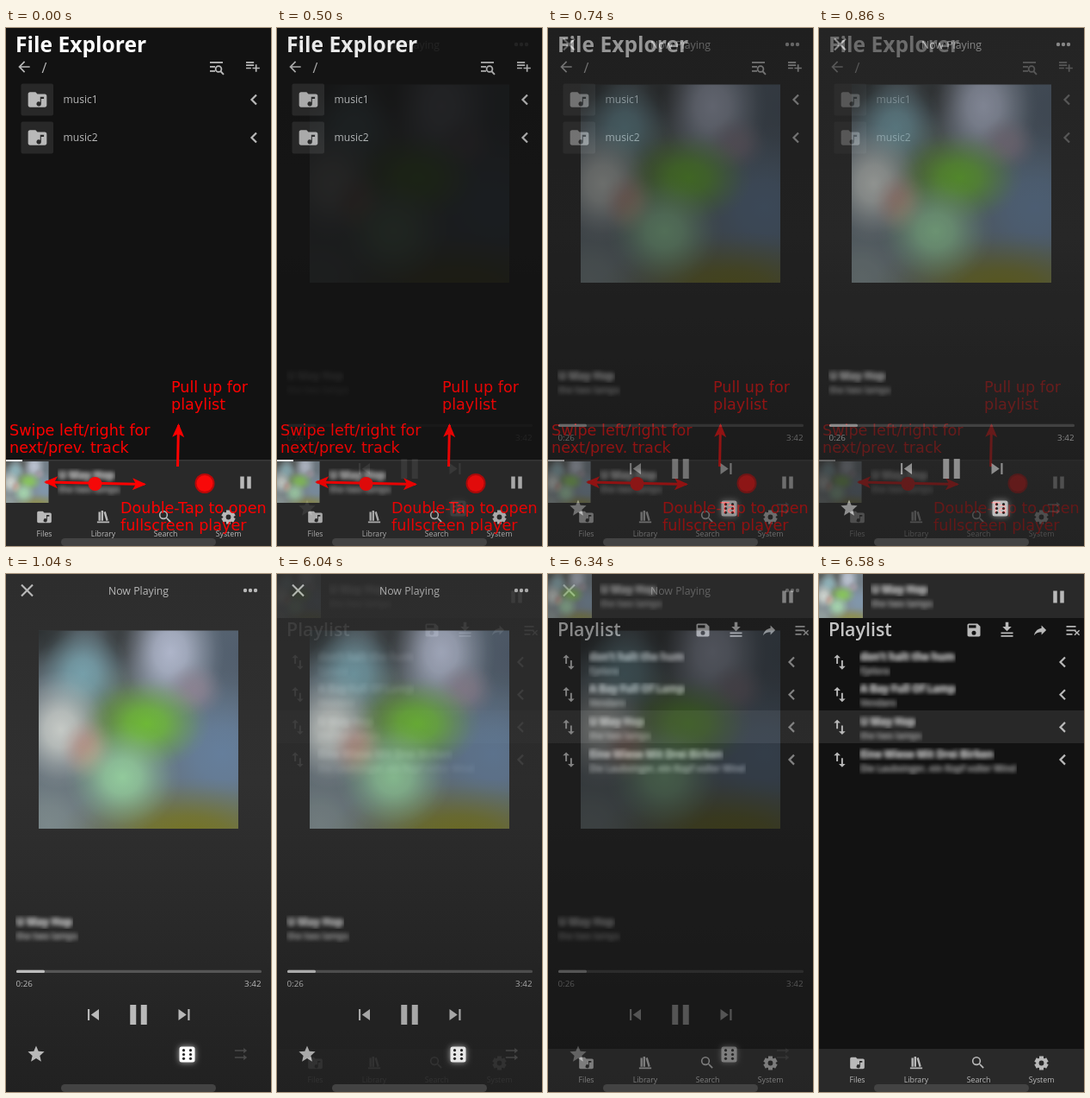
Animation, 308 px wide and 600 px high, one loop 8 s. Source, as an HTML page with a canvas:

```html
<!DOCTYPE html>
<html lang="en">
<head>
<meta charset="utf-8">
<title>Music player tour</title>
<style>
html, body { margin: 0; width: 100%; height: 100%; overflow: hidden; background: #121212; }
canvas { display: block; width: 100%; height: 100%; }
</style>
</head>
<body>
<canvas id="stage"></canvas>
<script>
const W = 308, H = 600, LOOP = 8000, STEP = 60, STEPS = 10;
const ratio = window.devicePixelRatio || 1;
const UI = '"Open Sans", "Noto Sans", sans-serif';
const NOTE = '"DejaVu Sans", sans-serif';
const INK = '#b9b9b9', BAR = '#292929', RED = '#ff0000';

const ICONS = {
  folder: 'M20 6h-8l-2-2H4c-1.1 0-2 .9-2 2v12c0 1.1.9 2 2 2h16c1.1 0 2-.9 2-2V8c0-1.1-.9-2-2-2zM19 9v2h-3v5.5a2.5 2.5 0 1 1-1-2V9z',
  back: 'M20 11H7.83l5.59-5.59L12 4l-8 8 8 8 1.41-1.41L7.83 13H20z',
  add: 'M14 10H3v2h11zM14 6H3v2h11zM18 14v-4h-2v4h-4v2h4v4h2v-4h4v-2zM3 16h7v-2H3z',
  books: 'M9 3v15h3V3zM12.6 5.3l3.8 13 2.9-.9-3.8-13zM5 5v13h3V5zM3 19v2h18v-2z',
  search: 'M15.5 14h-.79l-.28-.27A6.47 6.47 0 0 0 16 9.5 6.5 6.5 0 1 0 9.5 16c1.61 0 3.09-.59 4.23-1.57l.27.28v.79l5 4.99L20.49 19zM9.5 14a4.5 4.5 0 1 1 0-9 4.5 4.5 0 0 1 0 9z',
  star: 'M12 17.27 18.18 21l-1.64-7.03L22 9.24l-7.19-.61L12 2 9.19 8.63 2 9.24l5.46 4.73L5.82 21z',
  prev: 'M6 6h2v12H6zM9.5 12l8.5 6V6z',
  next: 'M6 18l8.5-6L6 6zM16 6h2v12h-2z',
  save: 'M17 3H5c-1.11 0-2 .9-2 2v14c0 1.1.89 2 2 2h14c1.1 0 2-.9 2-2V7zM12 19a3 3 0 1 1 0-6 3 3 0 0 1 0 6zM15 9H5V5h10z',
  download: 'M10 2h4v6h4l-6 6-6-6h4zM4 15.5h16v2H4zM4 19.5h16v2H4z',
  share: 'M14 9V5l7 7-7 7v-4.1c-5 0-8.5 1.6-11 5.1 1-5 4-10 11-11z',
  swap: 'M16 17.01V10h-2v7.01h-3L15 21l4-3.99zM9 3 5 6.99h3V14h2V6.99h3z',
  shift: 'M3 6h13V3l5 4-5 4V8H3zM3 16h13v-3l5 4-5 4v-3H3z'
};

// Soft cover colours: centre, radii (unit square) and colour
const BLOBS = [
  [0, 0, .32, .3, '#262929'], [.42, .02, .24, .34, '#343738'],
  [1, .12, .35, .5, '#4f5c6c'], [.36, .4, .25, .25, '#5c6a54'],
  [.92, .62, .45, .42, '#6580a0'], [.05, .98, .3, .3, '#7e8b8c'],
  [.22, .22, .24, .26, '#78a5b0'], [.66, .11, .27, .34, '#b8bed4'],
  [.78, .3, .16, .15, '#8d8291'], [.11, .5, .26, .3, '#d2d5cf'],
  [.25, .6, .15, .17, '#b88c80'], [.75, 1.02, .65, .28, '#77741a'],
  [.54, .47, .32, .24, '#6fc22e'], [.42, .74, .29, .28, '#98d6a0']
];

let c;

function sheet(paint) {
  const canvas = document.createElement('canvas');
  canvas.width = W * ratio;
  canvas.height = H * ratio;
  c = canvas.getContext('2d');
  c.scale(ratio, ratio);
  paint();
  return canvas;
}

function box(x, y, w, h, color, r = 0) {
  c.fillStyle = color;
  c.beginPath();
  c.roundRect(x, y, w, h, r);
  c.fill();
}

function dot(x, y, r, color) {
  c.fillStyle = color;
  c.beginPath();
  c.arc(x, y, r, 0, Math.PI * 2);
  c.fill();
}

function line(points, color, width) {
  c.strokeStyle = color;
  c.lineWidth = width;
  c.beginPath();
  points.forEach(([x, y]) => c.lineTo(x, y));
  c.stroke();
}

function text(str, x, y, size, color = INK, weight = 400, family = UI) {
  c.font = `${weight} ${size}px ${family}`;
  c.fillStyle = color;
  c.fillText(str, x, y);
}

function centered(str, x, y, size, color) {
  c.textAlign = 'center';
  text(str, x, y, size, color);
  c.textAlign = 'left';
}

function icon(name, x, y, size, color = INK) {
  c.save();
  c.translate(x, y);
  c.scale(size / 24, size / 24);
  c.translate(-12, -12);
  c.fillStyle = color;
  c.fill(new Path2D(ICONS[name]), 'evenodd');
  c.restore();
}

function cog(x, y) {
  for (let i = 0; i < 3; i++) {
    const a = Math.PI / 6 + i * Math.PI / 3;
    const dx = Math.cos(a) * 8, dy = Math.sin(a) * 8;
    line([[x - dx, y - dy], [x + dx, y + dy]], INK, 5);
  }
  dot(x, y, 6.2, INK);
  dot(x, y, 2.9, BAR);
}

function chevron(x, y) {
  line([[x + 5.5, y - 5.5], [x, y], [x + 5.5, y + 5.5]], INK, 2.2);
}

function cross(x, y, r, width, color = INK) {
  line([[x - r, y - r], [x + r, y + r]], color, width);
  line([[x + r, y - r], [x - r, y + r]], color, width);
}

function pause(x, y, w, h, gap, color = INK) {
  box(x - gap / 2 - w, y - h / 2, w, h, color);
  box(x + gap / 2, y - h / 2, w, h, color);
}

// Text smeared inside a hard-edged box
function smear(str, x, y, size, weight, color) {
  c.save();
  c.font = `${weight} ${size}px ${UI}`;
  c.beginPath();
  c.rect(x - 1, y - size, c.measureText(str).width + 2, size + 4);
  c.clip();
  c.filter = `blur(${2.6 * ratio}px)`;
  for (const shift of [-1, 1]) text(str, x + shift, y, size, color, weight);
  c.restore();
}

function blurred(title, artist, x, y, size = 12) {
  smear(title, x, y, size, 700, '#b4b4b4');
  smear(artist, x, y + 16, 10.4, 600, '#8a8a8a');
}

function cover(x, y, w, h) {
  c.save();
  c.beginPath();
  c.rect(x, y, w, h);
  c.clip();
  box(x, y, w, h, '#65717a');
  c.translate(x, y);
  c.scale(w, h);
  for (const [bx, by, rx, ry, color] of BLOBS) {
    c.save();
    c.translate(bx, by);
    c.scale(rx, ry);
    const g = c.createRadialGradient(0, 0, 0, 0, 0, 1);
    g.addColorStop(0, color + 'e0');
    g.addColorStop(.3, color + 'b8');
    g.addColorStop(.6, color + '58');
    g.addColorStop(.85, color + '14');
    g.addColorStop(1, color + '00');
    c.fillStyle = g;
    c.fillRect(-1, -1, 2, 2);
    c.restore();
  }
  c.restore();
}

function thumb(x, y, size) {
  cover(x, y, size, size);
  box(x, y, size, size, 'rgba(225,235,225,.22)');
}

function pill() {
  box(64, 591, 180, 9, '#434343', 4.5);
}

function nav() {
  box(0, 550, W, 50, BAR);
  icon('folder', 44.5, 566.5, 20);
  icon('books', 113, 566, 19);
  icon('search', 185, 566, 19);
  cog(258.5, 566.5);
  [['Files', 44.5], ['Library', 113], ['Search', 185.5], ['System', 258.5]]
    .forEach(([label, x]) => centered(label, x, 588.5, 8.8, INK));
  pill();
}

function arrow(x1, y1, x2, y2, heads) {
  line([[x1, y1], [x2, y2]], RED, 3);
  const a = Math.atan2(y2 - y1, x2 - x1);
  for (const [x, y, turn] of heads === 2 ? [[x2, y2, a], [x1, y1, a + Math.PI]] : [[x2, y2, a]]) {
    c.save();
    c.translate(x, y);
    c.rotate(turn);
    c.fillStyle = RED;
    c.beginPath();
    [[2, 0], [-14, -7], [-10, 0], [-14, 7]].forEach(p => c.lineTo(...p));
    c.fill();
    c.restore();
  }
}

function notes() {
  arrow(46, 526, 161, 528.5, 2);
  arrow(199.5, 508, 200.5, 460, 1);
  dot(103.5, 528, 8, '#f50808');
  dot(231, 527.5, 11.5, '#b80808');
  dot(231, 527.5, 9.5, '#f80909');
  [['Pull up for', 192, 422], ['playlist', 192, 442],
   ['Swipe left/right for', 4, 471.5], ['next/prev. track', 4, 492],
   ['Double-Tap to open', 133, 561.5], ['fullscreen player', 133, 582]]
    .forEach(([s, x, y]) => text(s, x, y, 17.6, RED, 400, NOTE));
}

function explorer() {
  box(0, 0, W, H, '#121212');
  text('File Explorer', 11, 27.5, 24.6, '#ffffff', 700);
  icon('back', 21, 45, 20);
  text('/', 41.5, 52, 16);
  // list with magnifier
  box(237, 39, 15, 1.8, INK);
  box(237, 44, 6, 1.8, INK);
  box(237, 49, 6, 1.8, INK);
  c.strokeStyle = INK;
  c.lineWidth = 1.8;
  c.beginPath();
  c.arc(247, 47.5, 3.4, 0, Math.PI * 2);
  c.stroke();
  line([[249.3, 50], [253, 53.8]], INK, 1.9);
  icon('add', 286.5, 44, 20);
  ['music1', 'music2'].forEach((name, i) => {
    const y = 83 + i * 44;
    box(17.5, y - 18.5, 37.5, 37, '#282828', 2);
    icon('folder', 36.5, y, 26);
    text(name, 66.5, y + 4, 12.1);
    chevron(285.5, y);
  });
  box(0, 501, W, 50, BAR);
  box(0, 500, W, 1.5, '#383838');
  box(0, 500, 19, 2, '#f4f4f4');
  thumb(0, 502, 49.5);
  blurred('U May Hop', 'the two lamps', 61, 522);
  pause(278.5, 526.5, 4.5, 14, 3.5);
  nav();
  notes();
}

function player() {
  const g = c.createLinearGradient(0, 0, 0, H);
  g.addColorStop(0, '#2d2d2d');
  g.addColorStop(.4, '#303030');
  g.addColorStop(1, '#212121');
  box(0, 0, W, H, g);
  cross(24.5, 19, 6.5, 2.1);
  centered('Now Playing', 154, 23.5, 12.3, INK);
  [278, 284, 290].forEach(x => dot(x, 19, 2.2, INK));
  cover(38, 65.5, 232, 229.5);
  blurred('U May Hop', 'the two lamps', 12, 407);
  box(12, 458.7, 285, 3.2, '#555555', 1.5);
  box(12, 458.7, 33, 3.2, '#bcbcbc', 1.5);
  text('0:26', 11.5, 478, 9.8);
  c.textAlign = 'right';
  text('3:42', 296.5, 478, 9.8);
  c.textAlign = 'left';
  icon('prev', 101.5, 510.5, 26);
  pause(154, 510.5, 7, 23, 5.5);
  icon('next', 207, 510.5, 26);
  icon('star', 35, 556, 23);
  c.save();
  c.shadowColor = 'rgba(255,255,255,.65)';
  c.shadowBlur = 7 * ratio;
  box(201.5, 547.5, 18, 18, '#ffffff', 2.5);
  c.restore();
  for (const x of [206.5, 214.5]) for (const y of [551.7, 556.5, 561.3]) dot(x, y, 1.6, '#252525');
  icon('shift', 273, 556, 19, '#494949');
  pill();
}

function playlist() {
  box(0, 0, W, H, '#121212');
  box(0, 0, W, 51, BAR);
  thumb(0, 0, 51);
  blurred('U May Hop', 'the two lamps', 61, 22);
  pause(278.5, 26.5, 4.5, 14, 3.5);
  text('Playlist', 11, 72, 21.4, '#c4c4c4', 600);
  icon('save', 180, 65, 20);
  icon('download', 218.5, 64.5, 21);
  icon('share', 257, 65, 19);
  [60, 64.5, 69].forEach((y, i) => box(287.5, y, i < 2 ? 11 : 7, 1.7, INK));
  cross(299.8, 68, 2.8, 1.5);
  box(0, 158, W, 38, '#282828');
  [['don’t halt the hum', 'Fjelora'],
   ['A Bay Full Of Lamp', 'Vendaro'],
   ['U May Hop', 'the two lamps'],
   ['Eine Wiese Mit Drei Birken', 'Die Laubsinger, ein Kopf voller Wind']]
    .forEach(([title, artist], i) => {
      const y = 102 + i * 37.7;
      icon('swap', 24, y, 23);
      blurred(title, artist, 48, y - 2.5, 11.8);
      chevron(280.5, y);
    });
  nav();
}

const scenes = [explorer, player, playlist].map(sheet);
const stage = document.getElementById('stage');
stage.width = W * ratio;
stage.height = H * ratio;
const view = stage.getContext('2d');

// Each fade advances in ten equal hard steps
const mix = (t, start) =>
  Math.max(0, Math.min(1, (Math.floor((t - start) / STEP) + 1) / STEPS));

function frame() {
  const t = performance.now() % LOOP;
  const second = t >= 6040;
  const from = second ? 1 : 0;
  view.globalAlpha = 1;
  view.drawImage(scenes[from], 0, 0);
  view.globalAlpha = mix(t, second ? 6040 : 500);
  view.drawImage(scenes[from + 1], 0, 0);
  requestAnimationFrame(frame);
}
frame();
</script>
</body>
</html>
```
